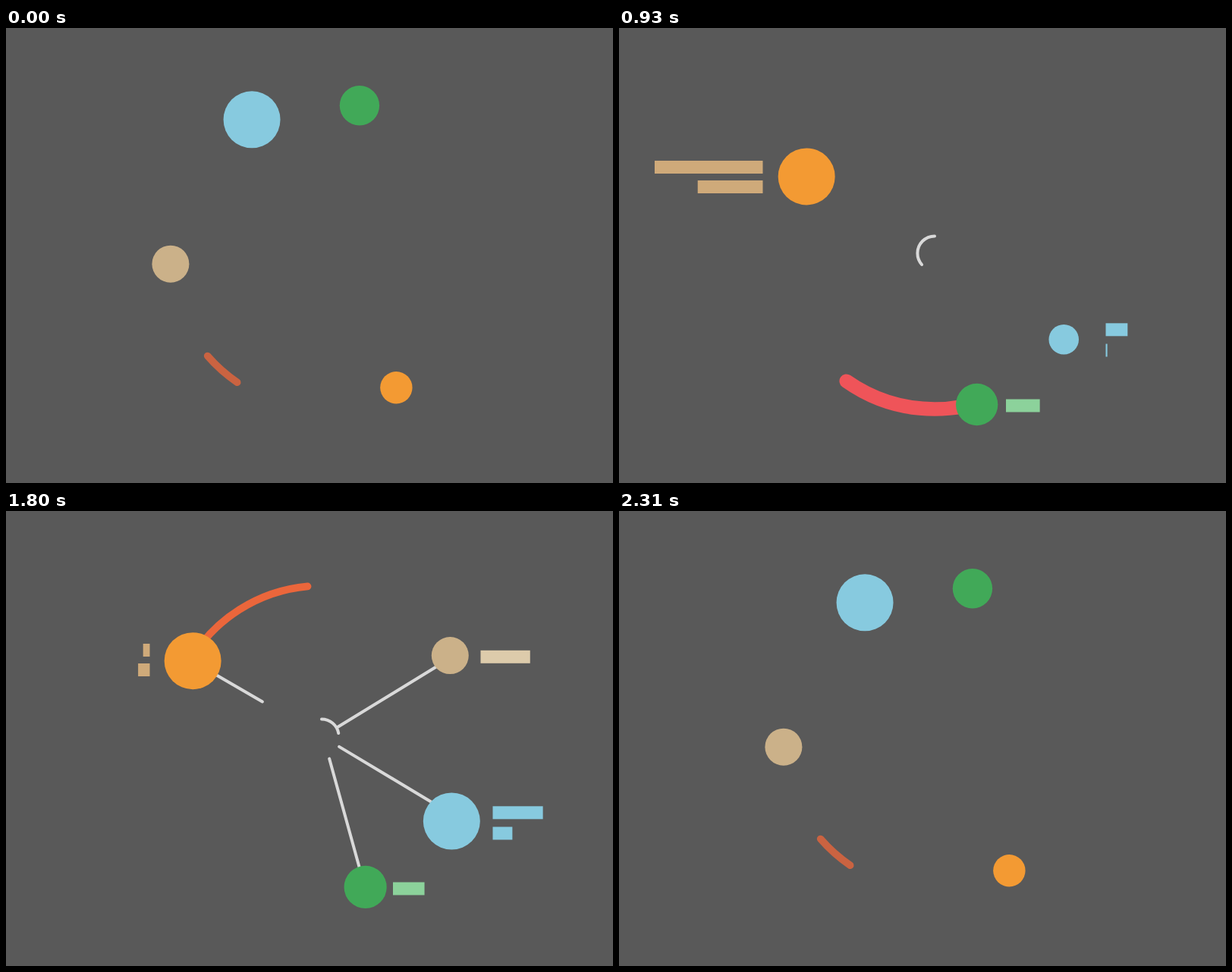
These frames come from a looping animation (800 by 600 pixels, 2340 ms). An HTML page:

```html
<!DOCTYPE html>
<html lang="en">
<head>
<meta charset="utf-8">
<title>Orbit</title>
<style>
html, body { margin: 0; width: 100%; height: 100%; overflow: hidden; background: #595959; }
svg { display: block; width: 100vw; height: 100vh; }
.stroke { fill: none; stroke-linecap: round; stroke-linejoin: round; }
</style>
</head>
<body>
<svg id="stage" viewBox="0 0 800 600"></svg>
<script>
const LOOP = 2340, STEP = 30, SEAM = 2310;
const CX = 416, CY = 300.5, R = 202;
const PX = 417.2, PY = 300.1; // pivot of the turn
const stage = document.getElementById('stage');

function add(tag, attrs) {
  const el = document.createElementNS('http://www.w3.org/2000/svg', tag);
  for (const k in attrs) el.setAttribute(k, attrs[k]);
  return stage.appendChild(el);
}

const stroke = (d, color, width) => add('path', {
  d, class: 'stroke', stroke: color, 'stroke-width': width, pathLength: 1
});

// Counter-clockwise circle that starts and ends at the top.
const loopPath = (x, y, r) =>
  `M${x} ${y - r}A${r} ${r} 0 0 0 ${x} ${y + r}A${r} ${r} 0 0 0 ${x} ${y - r}`;

// Timing curve with control points (x1,0) and (x2,1).
function curve(x1, x2) {
  return u => {
    if (u <= 0) return 0;
    if (u >= 1) return 1;
    let lo = 0, hi = 1;
    for (let i = 0; i < 24; i++) {
      const s = (lo + hi) / 2, k = 1 - s;
      if (3 * s * k * k * x1 + 3 * s * s * k * x2 + s * s * s < u) lo = s; else hi = s;
    }
    return lo * lo * (3 - 2 * lo);
  };
}

const smooth = curve(1 / 3, 2 / 3);
const snap = curve(.33, .25);
const spin = curve(.42, .66);
const headEase = curve(.62, 0);
const tailEase = curve(.29, .41);
const clamp = u => Math.max(0, Math.min(1, u));
const cubicOut = u => 1 - Math.pow(1 - clamp(u), 3);
const span = (t, start, length, ease) => ease((t - start) / length);

function popOut(u) {
  if (u <= 0) return 0;
  if (u >= 1) return 1;
  const v = u - 1;
  return 1 + 2.9 * v * v * v + 1.9 * v * v;
}

function trim(el, a, b) {
  const on = b - a > .0005;
  el.setAttribute('visibility', on ? 'visible' : 'hidden');
  if (!on) return;
  el.setAttribute('stroke-dasharray', `${b - a} 3`);
  el.setAttribute('stroke-dashoffset', -a);
}

const entry = stroke('M840 272C752 250 690 205 613 162C545 124 490 98.5 416 98.5', '#ef5459', 18.5);
const lap = stroke(loopPath(CX, CY, R), '#ef5459', 18.5);
const trail = stroke(loopPath(CX, CY, R), '#eb663b', 9.6);
const ring = stroke(loopPath(416, 297, 22.6), '#d9d9d9', 4);

// d: path, on/off: start times, outLen: time to retract
const lines = [
  { d: 'M396 285L275 215', on: 948, off: 1491, outLen: 635 },
  { d: 'M424 319L466 471', on: 963, off: 1752, outLen: 355 },
  { d: 'M436 309L566 387', on: 969, off: 1767, outLen: 355 },
  { d: 'M437 285L571 203', on: 994, off: 1815, outLen: 355 }
];
for (const l of lines) l.el = stroke(l.d, '#d9d9d9', 4);

// x: fixed edge, dir: side the bar grows to
const bars = [
  { x: 189.5, y: 175, w: 145, dir: -1, color: '#cfaa7a', on: 633, off: 1500 },
  { x: 189.5, y: 201, w: 92, dir: -1, color: '#cfaa7a', on: 693, off: 1564 },
  { x: 510, y: 489.5, w: 91.5, dir: 1, color: '#8cd29b', on: 850, off: 1647 },
  { x: 641.5, y: 389.3, w: 114, dir: 1, color: '#87cadf', on: 893, off: 1671 },
  { x: 641.5, y: 416.5, w: 28.7, dir: 1, color: '#87cadf', on: 920, off: 1735 },
  { x: 625.5, y: 183.8, w: 67.5, dir: 1, color: '#ddcbab', on: 1012, off: 1760 }
];
for (const b of bars) b.el = add('rect', { y: b.y, height: 17, fill: b.color });

const dots = [
  { angle: 211.5, dist: 199.4, r: 37.5, color: '#f39a33', on: 655, off: 2158 },
  { angle: 74.5, dist: 203.8, r: 28.1, color: '#41a958', on: 840, off: 2257 },
  { angle: 33.2, dist: 202, r: 37.5, color: '#87cadf', on: 895, off: 2308 },
  { angle: -32.5, dist: 200.6, r: 24.5, color: '#cbb189', on: 990, off: 2369 }
];
for (const d of dots) d.el = add('circle', { fill: d.color });

function draw(t) {
  // The exit carries on over the loop seam.
  const early = t < 600;
  const out = early ? t + SEAM : t;
  const turn = -190 * span(out, 1770, 750, spin);

  trim(entry, span(t, 78, 480, snap), span(t, 34, 400, snap));
  trim(lap, span(t, 638, 672, smooth), span(t, 546, 715, smooth));

  const head = span(out, 1532, 955, headEase);
  trim(trail, span(out, 1760, 710, tailEase), head > .004 ? head : 0);
  trail.setAttribute('transform', `rotate(${turn} ${PX} ${PY})`);
  trail.setAttribute('opacity', 1 - clamp((out - 2250) / 270));

  trim(ring, span(out, 1480, 460, smooth), span(t, 700, 562, smooth));

  lines.forEach((l, i) => {
    trim(l.el, span(out, l.off, l.outLen, smooth), span(t, l.on, 300, smooth));
    if (i === 0) l.el.setAttribute('opacity', 1 - clamp((out - 1980) / 110));
  });

  for (const b of bars) {
    const w = b.w * span(t, b.on, 400, cubicOut) * (1 - span(out, b.off, 420, snap));
    b.el.setAttribute('width', w);
    b.el.setAttribute('x', b.dir < 0 ? b.x - w : b.x);
  }

  for (const d of dots) {
    const size = early || t > 2100
      ? 1 - span(out, d.off, 333, smooth)
      : popOut((t - d.on) / 270);
    const a = (d.angle + turn) * Math.PI / 180;
    d.el.setAttribute('cx', PX + d.dist * Math.cos(a));
    d.el.setAttribute('cy', PY + d.dist * Math.sin(a));
    d.el.setAttribute('r', Math.max(0, d.r * size));
  }
}

let begin = null;
function tick(now) {
  if (begin === null) begin = now;
  const t = Math.max(0, now - begin) % LOOP;
  draw(Math.floor(t / STEP + .001) * STEP);
  requestAnimationFrame(tick);
}
draw(0);
requestAnimationFrame(tick);
</script>
</body>
</html>
```
